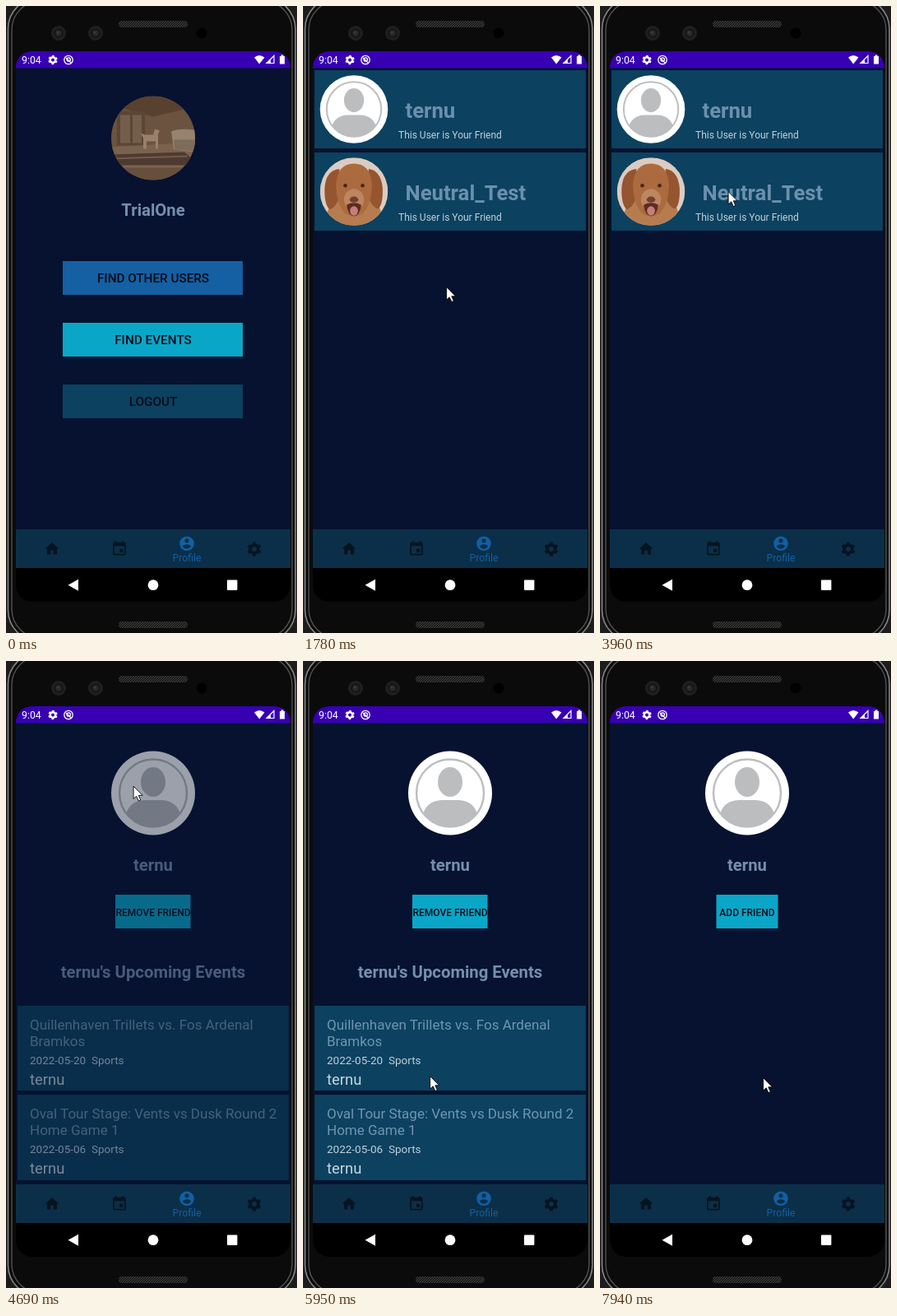
These frames come from a looping animation (354x762 px, 8000 ms). An HTML page:

```html
<!DOCTYPE html>
<html lang="en">
<head>
<meta charset="utf-8">
<title>Friends app</title>
<style>
html, body { margin: 0; width: 100%; height: 100%; overflow: hidden; background: #0b0b0b; }
svg { display: block; width: 354px; height: 762px; font-family: Roboto, sans-serif; }
.mid { text-anchor: middle; }
.name { font-weight: 700; font-size: 20.3px; fill: #7490ae; }
.big { font-weight: 700; font-size: 25.7px; fill: #6c90ab; }
.btn { font-weight: 500; font-size: 15.3px; fill: #050d18; }
.small { font-size: 12px; }
.note { font-size: 12px; fill: #c0d0da; }
.event { font-size: 17px; fill: #7195ad; }
.date { font-size: 13.5px; fill: #c0d0da; }
.who { font-size: 18.4px; fill: #c8d6df; }
.card { fill: #0c4160; }
</style>
</head>
<body>
<svg viewBox="0 0 354 762">
  <defs>
    <pattern id="mesh" width="3" height="3" patternUnits="userSpaceOnUse">
      <rect width="3" height="3" fill="#191919"/>
      <path d="M0 3L3 0" stroke="#484848" stroke-width=".9"/>
    </pattern>
    <clipPath id="screen"><rect x="12" y="55" width="334" height="669" rx="20"/></clipPath>
    <clipPath id="round"><circle r="51"/></clipPath>
    <clipPath id="inner"><circle r="41"/></clipPath>
    <g id="gear" fill="none" stroke="currentColor">
      <circle r="5.6" stroke-width="4.4"/>
      <circle r="8.3" stroke-width="3" pathLength="12" stroke-dasharray="1 1" stroke-dashoffset="1.5"/>
    </g>
    <g id="lens">
      <circle r="9" fill="#202022"/><circle r="6" fill="#17171a"/>
      <circle r="3.5" fill="#29292c"/><circle cx="-1" cy="-1" r="1.5" fill="#3b3b40"/>
    </g>
    <g id="person">
      <circle r="51" fill="#fff"/>
      <g fill="#bbbdbf">
        <ellipse cy="-13.5" rx="15" ry="18"/>
        <path clip-path="url(#inner)" d="M-34 28Q-29 9-10 8.5H10Q29 9 34 28V42H-34Z"/>
      </g>
      <circle r="41" fill="none" stroke="#bbbdbf" stroke-width="2.4"/>
    </g>
    <g id="room" clip-path="url(#round)">
      <rect x="-51" y="-51" width="102" height="102" fill="#6b5340"/>
      <path d="M-51-51H51V-38L0-26-51-40Z" fill="#59412f"/>
      <path d="M-44-33H-10V9H-44Z" fill="#5a4636"/>
      <path d="M-40-28h12v34h-12zM-25-28h11v34h-11z" fill="#745d49"/>
      <path d="M-51 11L51 5V51H-51Z" fill="#7a624e"/>
      <path d="M-51 20L38 17 51 28V33H-51Z" fill="#4d3b31"/>
      <path d="M-51 25L42 22" stroke="#74594a" stroke-width="2"/>
      <path d="M-51 36H51V51H-51Z" fill="#674f3d"/>
      <path d="M22-8Q30-12 51-10V17L25 14Z" fill="#96836f"/>
      <path d="M25 2H51V16L26 14Z" fill="#7f6b59"/>
      <path d="M-12 13V0L-15-6 -10-4H0L2-11 8-9 6-5 6 13H3V4H-8V13Z" fill="#99806a"/>
    </g>
    <g id="dog" clip-path="url(#round)">
      <rect x="-51" y="-51" width="102" height="102" fill="#dccbc2"/>
      <path d="M-42 51Q-42 24-28 8H28Q44 24 42 51Z" fill="#b67c50"/>
      <path d="M-22-34Q-42-32-44-6-45 20-36 27-24 22-20 0Z" fill="#94552f"/>
      <path d="M22-34Q40-32 43-6 44 20 36 26 24 22 20 0Z" fill="#94552f"/>
      <path d="M0-42Q24-42 27-12 27 18 14 32 0 42-14 32-27 18-27-12-24-42 0-42Z" fill="#ab6b3e"/>
      <ellipse cy="12" rx="15" ry="16" fill="#bd8560"/>
      <path d="M-11 20Q0 14 11 20 9 36 0 37-9 36-11 20Z" fill="#5a2b24"/>
      <ellipse cy="29" rx="6" ry="7" fill="#c47f78"/>
      <ellipse cy="12" rx="6.5" ry="4.5" fill="#70402f"/>
      <circle cx="-13" cy="-9" r="2.8" fill="#42251a"/><circle cx="13" cy="-9" r="2.8" fill="#42251a"/>
    </g>
  </defs>

  <!-- phone body -->
  <rect width="354" height="762" fill="#1c1c1c"/>
  <g fill="#0b0b0b">
    <rect x="2.5" y="-10" width="349.5" height="782" rx="38" stroke="#858585" stroke-width="1.6"/>
    <rect x="7" y="-6" width="341" height="774" rx="35" stroke="#525252" stroke-width="1.4"/>
  </g>
  <rect x="137" y="18" width="84" height="8" rx="4" fill="url(#mesh)"/>
  <rect x="137" y="748" width="84" height="8" rx="4" fill="url(#mesh)"/>
  <use href="#lens" x="64" y="33"/><use href="#lens" x="109" y="33"/>
  <circle cx="238" cy="33" r="6.5" fill="#000"/>

  <g clip-path="url(#screen)">
    <rect x="12" y="55" width="334" height="669" fill="#06122f"/>
    <rect x="12" y="55" width="334" height="20.5" fill="#3700b3"/>

    <g id="profile">
      <use href="#room" x="179" y="160.5"/>
      <text class="name mid" x="179" y="255">TrialOne</text>
      <rect x="69" y="310" width="219" height="41" fill="#155fa3"/>
      <rect x="69" y="385" width="219" height="41" fill="#0aa6c8"/>
      <rect x="69" y="460" width="219" height="41" fill="#0c4160"/>
      <g class="btn mid">
        <text x="179" y="336">FIND OTHER USERS</text>
        <text x="179" y="411">FIND EVENTS</text>
        <text x="179" y="486">LOGOUT</text>
      </g>
    </g>

    <g id="list">
      <rect class="card" x="14" y="78" width="330" height="95"/>
      <use href="#person" transform="translate(62 125.5) scale(.81)"/>
      <text class="big" x="124.5" y="136">ternu</text>
      <text class="note" x="116" y="161">This User is Your Friend</text>
      <rect class="card" x="14" y="178" width="330" height="95"/>
      <use href="#dog" transform="translate(62 225.5) scale(.81)"/>
      <text class="big" x="124.5" y="236">Neutral_Test</text>
      <text class="note" x="116" y="261">This User is Your Friend</text>
    </g>

    <g id="friend">
      <use href="#person" x="179" y="160.5"/>
      <text class="name mid" x="179" y="255">ternu</text>
      <g id="added">
        <rect x="133" y="284" width="91.5" height="41" fill="#0aa6c8"/>
        <text class="btn small mid" x="179" y="309.5">REMOVE FRIEND</text>
        <text class="name mid" x="179" y="385">ternu's Upcoming Events</text>
        <rect class="card" x="14" y="419" width="330" height="103"/>
        <text class="event" x="29" y="448">Quillenhaven Trillets vs. Fos Ardenal</text>
        <text class="event" x="29" y="468">Bramkos</text>
        <text class="date" x="29" y="489.5">2022-05-20</text><text class="date" x="104" y="489.5">Sports</text>
        <text class="who" x="29" y="515">ternu</text>
        <rect class="card" x="14" y="527" width="330" height="104"/>
        <text class="event" x="29" y="556">Oval Tour Stage: Vents vs Dusk Round 2</text>
        <text class="event" x="29" y="576">Home Game 1</text>
        <text class="date" x="29" y="597.5">2022-05-06</text><text class="date" x="104" y="597.5">Sports</text>
        <text class="who" x="29" y="623">ternu</text>
      </g>
      <g id="removed">
        <rect x="141.5" y="284" width="75" height="41" fill="#0aa6c8"/>
        <text class="btn small mid" x="179" y="309.5">ADD FRIEND</text>
      </g>
    </g>

    <!-- status bar -->
    <g fill="#fff" color="#fff">
      <text x="19" y="70" font-size="12.3">9:04</text>
      <use href="#gear" transform="translate(57 65.5) scale(.58)"/>
      <g fill="none" stroke="#fff" stroke-width="1.3">
        <circle cx="76" cy="65.5" r="5.2"/><circle cx="76.2" cy="65" r="2.2"/><path d="M73 63L79 69"/>
      </g>
      <path d="M302 62.5Q308 57.5 314.5 62.5L308.2 70.5Z"/>
      <path d="M317 69.5L326 60.5V69.5Z" fill="none" stroke="#fff" stroke-width="1.2"/>
      <path d="M316.5 70L322 64.5V70Z"/>
      <path d="M333 61h1.6v-1.5h2.8V61H339v9.5h-6z"/>
    </g>

    <!-- bottom bars -->
    <rect x="12" y="636" width="334" height="47" fill="#0b2f49"/>
    <g fill="#07141f" color="#07141f">
      <path transform="translate(45.8 649.5) scale(.85)" d="M10 20v-6h4v6h5v-8h3L12 3 2 12h3v8z"/>
      <path transform="translate(127.5 649.2) scale(.87)" fill-rule="evenodd" d="M17 12h-5v5h5zM16 1v2H8V1H6v2H5Q3 3 3 5V19Q3 21 5 21H19Q21 21 21 19V5Q21 3 19 3H18V1ZM19 19H5V8H19Z"/>
      <use href="#gear" transform="translate(302 660) scale(.87)"/>
    </g>
    <g fill="#135fa3">
      <circle cx="220" cy="653.3" r="8.8"/>
      <text class="mid" x="220" y="674.5" font-size="12.2">Profile</text>
    </g>
    <g fill="#0b2f49">
      <circle cx="220" cy="649.8" r="2.6"/>
      <path d="M214.7 656.8Q216 654.3 220 654.2 224 654.3 225.3 656.8 223.3 659.7 220 659.7 216.7 659.7 214.7 656.8Z"/>
    </g>
    <rect x="12" y="683" width="334" height="41"/>
    <g fill="#fff">
      <path d="M75.5 703.7L88 696.7V710.7Z"/>
      <circle cx="179" cy="703.7" r="6.4"/>
      <rect x="269" y="697.5" width="12.4" height="12.6" rx="1"/>
    </g>
  </g>

  <path id="cursor" d="M.6 .6V16L4.2 12.8 6.8 18.6 9.3 17.5 6.8 11.8H11.6Z" fill="#fff" stroke="#05070d" stroke-width=".9"/>
</svg>
<script>
const LOOP = 8000, STEP = 66.7;
const $ = id => document.getElementById(id);

// [start ms, steps, points visited after the previous position]
const moves = [
  [250, 6, [[199, 411], [188, 370], [170, 326], [162, 315], [169, 330], [174, 340]]],
  [910, 1, [[174, 341]]],
  [2240, 10, [[183, 300], [184, 255], [165, 199], [116, 225], [144, 260]]],
  [2907, 3, [[152, 262], [148, 254]]],
  [3100, 13, [[156, 262], [143, 264], [142, 250], [156, 249], [157, 262], [147, 248]]],
  [3960, 3, [[155.5, 225], [152, 185], [147, 154]]],
  [4560, 5, [[159, 150]]],
  [5150, 13, [[130, 300], [84, 440], [160, 470], [296, 455], [280, 540], [190, 542], [154, 504]]],
  [6010, 1, [[153, 505]]],
  [6280, 11, [[146, 451], [160, 350], [169, 302]]],
  [7340, 7, [[152, 370], [139, 445], [215, 500], [302, 519]]],
  [7940, 1, [[198, 506]]]
];

// Stepped progress from 0 to 1; the first step lands at the start time.
const progress = (t, start, steps) =>
  t < start ? 0 : Math.min(1, (Math.floor((t - start + 7) / STEP) + 1) / steps);

// Smooth curve through the points, u in 0..1
function along(points, u) {
  const last = points.length - 1;
  const i = Math.min(last - 1, Math.floor(u * last)), f = u * last - i;
  const at = k => points[Math.max(0, Math.min(last, k))];
  return [0, 1].map(c => {
    const [a, b, d, e] = [at(i - 1)[c], at(i)[c], at(i + 1)[c], at(i + 2)[c]];
    return b + f / 2 * (d - a + f * (2 * a - 5 * b + 4 * d - e + f * (3 * (b - d) + e - a)));
  });
}

function cursorAt(t) {
  let position = [205, 430];
  for (const [start, steps, points] of moves) {
    if (t < start) break;
    position = along([position, ...points], progress(t, start, steps));
  }
  return position;
}

const show = (id, opacity) => $(id).setAttribute("opacity", opacity);

function draw() {
  const t = performance.now() % LOOP;
  show("profile", 1 - progress(t, 1180, 4));
  show("list", progress(t, 1710, 2) - progress(t, 4230, 4));
  show("friend", progress(t, 4560, 5));
  show("added", t < 7080 ? 1 : 0);
  show("removed", t < 7080 ? 0 : 1);
  show("cursor", t < 250 ? 0 : 1);
  $("cursor").setAttribute("transform", `translate(${cursorAt(t)})`);
  requestAnimationFrame(draw);
}
draw();
</script>
</body>
</html>
```
